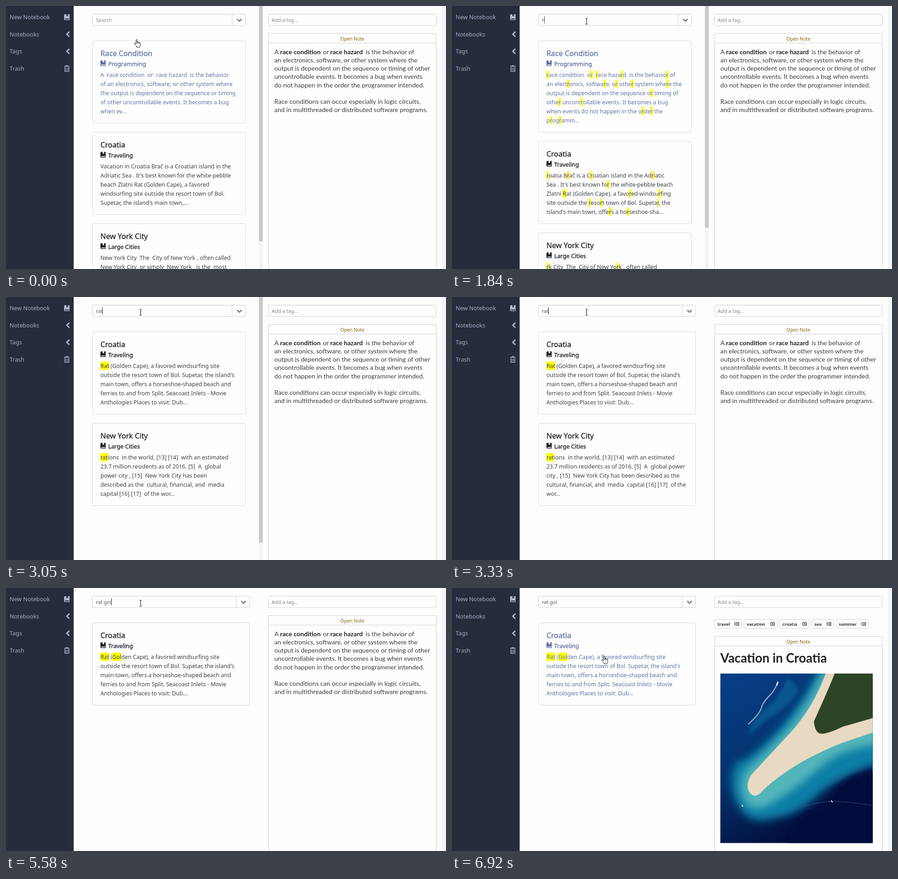
Recreate the animation shown at these times as an HTML page. Size 969 by 578 pixels, loop 8000 ms.

```html
<!DOCTYPE html>
<html lang="en">
<head>
<meta charset="utf-8">
<title>Note search</title>
<style>
html, body { margin: 0; width: 100%; height: 100%; overflow: hidden; background: #fdfdfd; }
svg { display: block; }
text { white-space: pre; font-family: "Noto Sans", "Open Sans", sans-serif; }
.side { font-size: 12.7px; fill: #a5abc4; }
.input { font-size: 11px; fill: #555; }
.hint { font-size: 11px; fill: #858585; }
.title { font-size: 16.2px; fill: #1d2027; stroke: #1d2027; stroke-width: .3px; }
.book { font-size: 12.75px; fill: #1d2027; stroke: #1d2027; stroke-width: .35px; }
.icon { fill: #1d2027; fill-rule: evenodd; }
.body { font-size: 12.4px; fill: #3d4047; }
.sel text, .sel .icon { fill: #6272a4; }
.sel .title, .sel .book { stroke: #6272a4; }
.open { font-size: 10.3px; fill: #86660c; text-anchor: middle; }
.note { font: 14.1px Lato, sans-serif; fill: #3b3b3b; }
.strong { font-weight: 700; fill: #222; }
.head { font: 700 27.8px Lato, sans-serif; fill: #222; }
.tag { font-size: 9.4px; font-weight: 700; fill: #333; }
.box { fill: #fefefe; stroke: #cfcfcf; }
.card { fill: #fefefe; stroke: #dadada; }
.line { fill: none; stroke: #cfcfcf; }
</style>
</head>
<body>
<svg id="stage" width="969" height="578" viewBox="0 0 969 578">
  <defs>
    <clipPath id="frame"><rect x="591" y="188" width="335.5" height="372.5"/></clipPath>
    <linearGradient id="sea" x1="0" y1="0" x2=".5" y2="1">
      <stop offset="0" stop-color="#073f86"/>
      <stop offset=".5" stop-color="#053470"/>
      <stop offset="1" stop-color="#020b38"/>
    </linearGradient>
    <filter id="soft" x="-20%" y="-20%" width="140%" height="140%"><feGaussianBlur stdDeviation="9"/></filter>
    <filter id="softer" x="-20%" y="-20%" width="140%" height="140%"><feGaussianBlur stdDeviation="4"/></filter>
  </defs>
</svg>
<script>
const LOOP = 8000;
const BOOK = 'M2 0H5V5L6.7 3.7 8.4 5V0H12V13H2Q0 13 0 11V2Q0 0 2 0ZM2 9.6H10.8V11.4H2Z';
const svg = document.getElementById('stage');

function el(parent, tag, attrs, content) {
  const node = document.createElementNS('http://www.w3.org/2000/svg', tag);
  for (const key in attrs) node.setAttribute(key, attrs[key]);
  if (content) node.textContent = content;
  return parent.appendChild(node);
}
const group = (parent, attrs) => el(parent, 'g', attrs);
const text = (parent, x, y, cls, str) => el(parent, 'text', { x, y, class: cls }, str);
const rect = (parent, x, y, width, height, attrs) => el(parent, 'rect', { x, y, width, height, ...attrs });
const path = (parent, d, attrs) => el(parent, 'path', { d, ...attrs });
const show = (node, on) => node.setAttribute('display', on ? 'inline' : 'none');

// ---- notes ----
const raceHit = ['race condition  or  race hazard  is the behavior of',
  'an electronics, software, or other system where the',
  'output is dependent on the sequence or timing of',
  'other uncontrollable events. It becomes a bug',
  'when events do not happen in the order the', 'programm...'];
const capeHit = ['Rat (Golden Cape), a favored windsurfing site',
  'outside the resort town of Bol. Supetar, the island\'s',
  'main town, offers a horseshoe-shaped beach and',
  'ferries to and from Split. Seacoast Inlets - Movie',
  'Anthologies Places to visit: Dub...'];
const cityHit = ['rations  in the world, [13] [14]  with an estimated',
  '23.7 million residents as of 2016. [5]  A  global power',
  'city , [15]  New York City has been described as the',
  'cultural, financial, and  media  capital [16] [17]  of the', 'wor...'];
const race = lines => ({ title: 'Race Condition', book: 'Programming', lines, sel: true });
const coast = lines => ({ title: 'Croatia', book: 'Traveling', lines });
const city = lines => ({ title: 'New York City', book: 'Large Cities', lines });
const wide = [coast(capeHit), city(cityHit)];

// Each view: start time, query, right edge, scroll thumb length, notes
const views = [
  [0, '', 527.5, 517, [
    race(['A  race condition  or  race hazard  is the behavior',
      'of an electronics, software, or other system where',
      'the output is dependent on the sequence or timing',
      'of other uncontrollable events. It becomes a bug', 'when ev...']),
    coast(['Vacation in Croatia Brač is a Croatian island in the',
      'Adriatic Sea . It\'s best known for the white-pebble',
      'beach Zlatni Rat (Golden Cape), a favored',
      'windsurfing site outside the resort town of Bol.',
      'Supetar, the island\'s main town,...']),
    city(['New York City  The  City of New York , often called',
      'New York City  or simply  New York , is the  most', '', '', ''])]],
  [1840, 'r', 527.5, 487, [
    race(raceHit),
    coast(['roatia Brač is a Croatian island in the Adriatic',
      'Sea . It\'s best known for the white-pebble beach',
      'Zlatni Rat (Golden Cape), a favored windsurfing',
      'site outside the resort town of Bol. Supetar, the',
      'island\'s main town, offers a horseshoe-sha...']),
    city(['rk City  The  City of New York , often called', '', '', '', ''])]],
  [2120, 'ra', 527.5, 487, [
    race(raceHit),
    coast(['rač is a Croatian island in the Adriatic Sea . It\'s best',
      'known for the white-pebble beach Zlatni Rat',
      '(Golden Cape), a favored windsurfing site outside',
      'the resort town of Bol. Supetar, the island\'s main',
      'town, offers a horseshoe-shaped beach and f...']),
    city(cityHit)]],
  [3050, 'rat', 527.5, 540, [
    coast(capeHit),
    city([cityHit[0], '23.7 million residents as of 2016. [5]  A  global',
      'power city , [15]  New York City has been',
      'described as the  cultural, financial, and  media',
      'capital [16] [17]  of the wor...'])]],
  [3330, 'rat', 536.5, 0, wide],
  [4810, 'rat ', 536.5, 0, wide],
  [5210, 'rat g', 536.5, 0, wide],
  [5330, 'rat go', 536.5, 0, wide],
  [5580, 'rat gol', 536.5, 0, [coast(capeHit)]]
];

// ---- list ----
function bodyLine(g, y, str, words) {
  const t = text(g, 208, y, 'body', str);
  if (!words.length) return;
  for (const m of str.matchAll(new RegExp(words.join('|'), 'gi'))) {
    const x = t.getStartPositionOfChar(m.index).x;
    const mark = rect(g, x, y - 14, t.getSubStringLength(m.index, m[0].length), 18, { fill: '#ff0' });
    g.insertBefore(mark, t);
  }
}

function card(parent, top, right, note, words) {
  const g = group(parent, { class: note.sel ? 'sel' : '' });
  const height = 81 + 20 * note.lines.length;
  rect(g, 190.5, top + .5, right - 190.5, height, { rx: 3, class: 'card' });
  text(g, 208, top + 34, 'title', note.title);
  path(g, BOOK, { class: 'icon', transform: `translate(208 ${top + 43.5}) scale(.96)` });
  text(g, 225, top + 56, 'book', note.book);
  note.lines.forEach((s, i) => bodyLine(g, top + 80 + 20 * i, s, words));
  return top + height + 20;
}

function buildView([at, query, right, thumb, notes]) {
  const g = group(svg);
  const split = right - 29.5;
  rect(g, 190.5, 18, right - 190.5, 25, { rx: 2.5, class: 'box' });
  path(g, `M${split} 18V43`, { class: 'line' });
  path(g, `M${split + 11} 28.5l5 5 5-5`, { fill: 'none', stroke: '#85858a', 'stroke-width': 3 });
  const field = text(g, 198, 35, query ? 'input' : 'hint', query || 'Search');
  const caretX = 198 + (query ? field.getComputedTextLength() : 0);
  const words = query.split(' ').filter(Boolean);
  notes.reduce((top, note) => card(g, top, right, note, words), 76);
  if (thumb) {
    rect(g, 557, 0, 8.5, 578, { fill: '#f4f4f4' });
    rect(g, 557, 0, 8.5, thumb, { fill: '#c9c9c9' });
  }
  return { at, g, caretX };
}

// ---- sidebar ----
function buildSide() {
  const g = group(svg);
  rect(g, 0, 0, 149, 578, { fill: '#272c3d' });
  ['New Notebook', 'Notebooks', 'Tags', 'Trash'].forEach((s, i) => text(g, 8, 29.2 + 37.5 * i, 'side', s));
  path(g, BOOK, { transform: 'translate(128 18)', fill: '#b3b9cf', 'fill-rule': 'evenodd' });
  for (const y of [62, 99.5]) {
    path(g, `M139.5 ${y - 5.5}l-5.5 5.5 5.5 5.5`, { fill: 'none', stroke: '#b3b9cf', 'stroke-width': 2.8 });
  }
  path(g, 'M128 132.5H140M132 132V130.8H136V132M129.5 134V143.5H138.500V134M132.300 135.500V141.500M135.700 135.500V141.500',
    { fill: 'none', stroke: '#b3b9cf', 'stroke-width': 1.3 });
}

// ---- preview ----
function panel(parent, top) {
  rect(parent, 578.5, top + .5, 369, 600, { class: 'box' });
  path(parent, `M578.5 ${top + 21.5}H947.5`, { class: 'line' });
  text(parent, 763, top + 15.5, 'open', 'Open Note');
}

function buildRaceNote() {
  const g = group(svg);
  panel(g, 60);
  text(g, 591, 105.5, 'note', 'A');
  text(g, 603.5, 105.5, 'note strong', 'race condition');
  text(g, 698, 105.5, 'note', 'or');
  text(g, 714, 105.5, 'note strong', 'race hazard');
  text(g, 792, 105.5, 'note', 'is the behavior of');
  ['an electronics, software, or other system where the',
    'output is dependent on the sequence or timing of other',
    'uncontrollable events. It becomes a bug when events',
    'do not happen in the order the programmer intended.', '',
    'Race conditions can occur especially in logic circuits,',
    'and in multithreaded or distributed software programs.'
  ].forEach((s, i) => text(g, 591, 123.8 + 18.27 * i, 'note', s));
  return g;
}

function tag(g, x, right, name) {
  rect(g, x, 69, right - x, 19.5, { rx: 2.5, class: 'box' });
  text(g, x + 6, 82.7, 'tag', name);
  path(g, `M${right - 16} 79l3-3.500h6.500v7h-6.500z`, { fill: 'none', stroke: '#333', 'stroke-width': 1.2 });
  path(g, `M${right - 11.7} 77.300l3.400 3.400m0-3.400l-3.400 3.400`, { stroke: '#333', 'stroke-width': 1.2 });
}

function photo(parent) {
  const g = group(parent, { 'clip-path': 'url(#frame)' });
  rect(g, 591, 188, 336, 373, { fill: 'url(#sea)' });
  path(g, 'M740 195Q722 240 690 265T652 325Q690 290 715 275T765 225Z',
    { fill: '#0b6a9c', opacity: .6, filter: 'url(#softer)' });
  path(g, 'M808 180Q770 255 715 315T625 385Q605 430 628 475T700 508Q760 500 800 460T940 385V180Z',
    { fill: '#0d7ea6', filter: 'url(#soft)' });
  path(g, 'M818 180Q780 265 730 318T646 400Q628 440 645 468T700 475Q760 440 810 395T940 345V180Z',
    { fill: '#5fbfbd', opacity: .85, filter: 'url(#soft)' });
  path(g, 'M735 570Q745 510 790 492T845 440Q880 405 940 402V570Z',
    { fill: '#030d3e', filter: 'url(#softer)' });
  path(g, 'M826 180Q797 262 745 318T658 412Q645 436 656 450T682 448Q700 428 745 398T860 340L940 313V180Z',
    { fill: '#e8d9c2' });
  path(g, 'M846 180Q832 215 820 242T797 293Q799 318 812 320T860 305L940 282V180Z', { fill: '#2d4526' });
  path(g, 'M717 208Q712 224 698 238T681 264T652 300',
    { fill: 'none', stroke: '#d5e4ee', 'stroke-width': 2.5, opacity: .65 });
  path(g, 'M715 214L718 206', { stroke: '#fff', 'stroke-width': 3 });
  path(g, 'M772 480Q810 470 836 469T926 478', { fill: 'none', stroke: '#52648c', 'stroke-width': .7 });
  path(g, 'M638 477l3 3M835 467l3 4', { stroke: '#fff', 'stroke-width': 2 });
}

function buildTripNote() {
  const g = group(svg);
  tag(g, 578.5, 638, 'travel');
  tag(g, 643, 716.5, 'vacation');
  tag(g, 721.5, 787, 'croatia');
  tag(g, 792, 841, 'sea');
  tag(g, 846, 917.5, 'summer');
  panel(g, 106);
  text(g, 591, 163.5, 'head', 'Vacation in Croatia');
  photo(g);
  return g;
}

// ---- pointer ----
function buildPointers() {
  const ink = { fill: '#fff', stroke: '#111', 'stroke-linejoin': 'round' };
  const hand = group(svg);
  path(hand, 'M4.500 10.500V1.800Q4.500 .5 5.700 .5T7 1.800V6.500Q7 5.500 8 5.600T9.200 7Q9.500 6.100 10.400 6.300T11.500 7.800Q12 6.900 12.800 7.200T13.900 8.800V12.500Q13.900 14.500 12.700 15.500V17.500H5.800V16Q3 12.800 1 10.200Q.3 9.200 1.200 8.600T3 9Z', ink);
  path(hand, 'M7 6.500V9.500M9.200 7V9.500M11.500 7.800V9.500', { stroke: '#111' });
  const arrow = path(svg, 'M.5 .5V14L3.600 11 5.800 16 7.800 15.200 5.700 10.400H10Z', ink);
  const beam = path(svg, 'M-2.500 -6.500H2.500M0 -6.500V6.500M-2.500 6.500H2.500', { fill: 'none', stroke: '#222', 'stroke-width': 1.2 });
  return { hand, arrow, beam };
}

const moves = [
  [0, 'hand', 282, 73], [120, 'arrow', 291, 59], [240, 'arrow', 294, 41],
  [390, 'beam', 298, 36.5], [510, 'beam', 296.5, 33.5],
  [6290, 'beam', 298, 38], [6410, 'arrow', 303, 57],
  [6530, 'hand', 311, 92], [6650, 'hand', 324, 132], [6770, 'hand', 329, 149]
];
const blinks = [[940, 1310], [1840, 2680], [3050, 3580], [4100, 4500], [4810, 6140], [6650, 6770]];

// ---- assembly ----
buildSide();
const scenes = views.map(buildView);
rect(svg, 578.5, 18, 369, 25, { rx: 2.5, class: 'box' });
text(svg, 585, 35, 'hint', 'Add a tag...');
rect(svg, 961, 0, 8, 578, { fill: '#f4f4f4' });
const raceNote = buildRaceNote();
const tripNote = buildTripNote();
const caret = rect(svg, 0, 22.5, 1, 15.5, { fill: '#222' });
const pointers = buildPointers();
const lastCard = scenes[scenes.length - 1].g.querySelector('g');

function draw(t) {
  const scene = scenes.findLast(s => s.at <= t);
  scenes.forEach(s => show(s.g, s === scene));
  lastCard.setAttribute('class', t >= 6530 ? 'sel' : '');

  show(raceNote, t < 6920);
  show(tripNote, t >= 6920);

  show(caret, blinks.some(([on, off]) => t >= on && t < off));
  caret.setAttribute('x', Math.round(scene.caretX));

  const [, kind, x, y] = moves.findLast(m => m[0] <= t);
  for (const name in pointers) show(pointers[name], name === kind);
  pointers[kind].setAttribute('transform', `translate(${x} ${y})`);
}

const start = performance.now();
function tick() {
  draw((performance.now() - start) % LOOP);
  requestAnimationFrame(tick);
}
tick();
</script>
</body>
</html>
```
